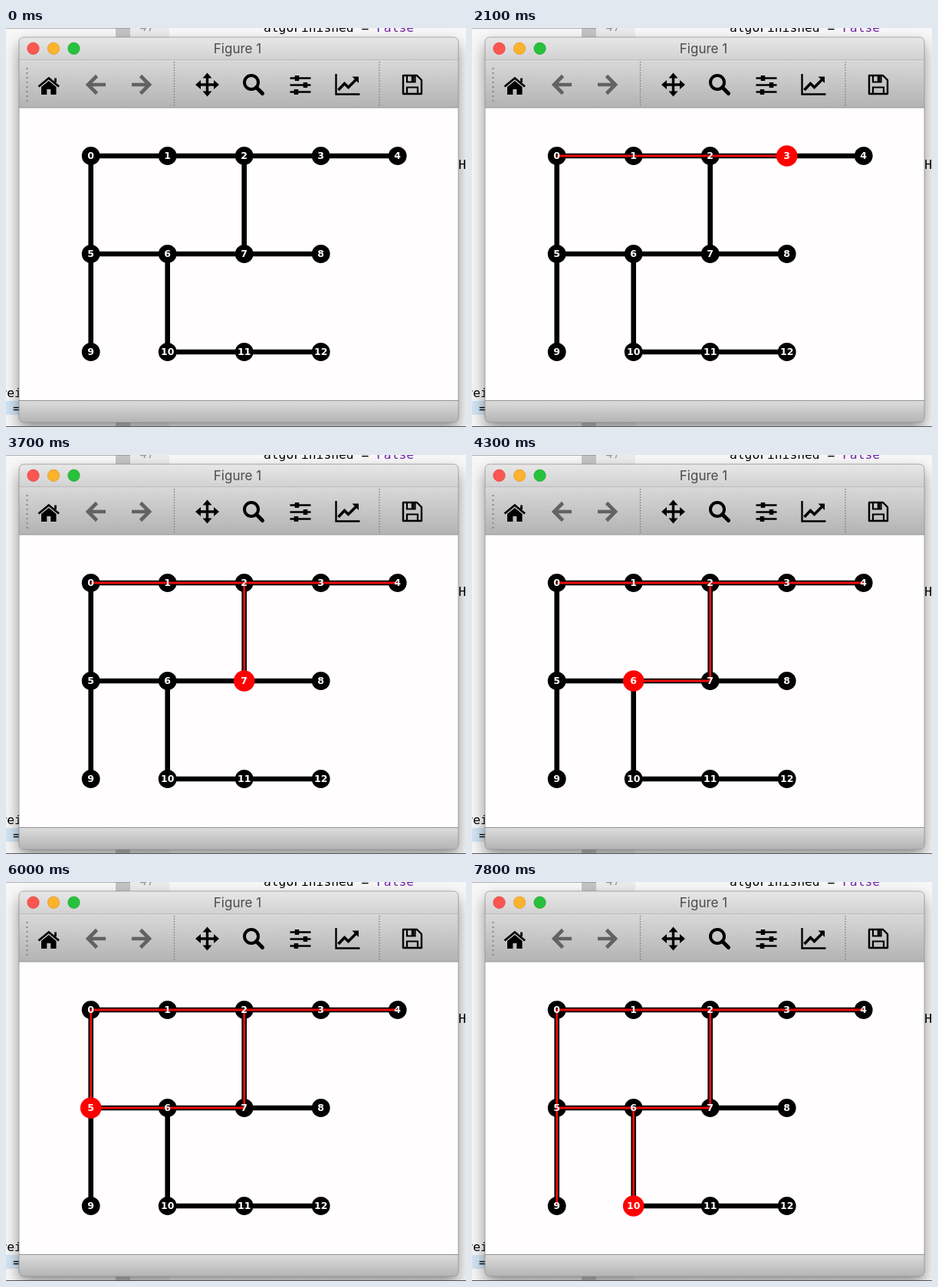
Animation of 600 by 521 pixels, one loop 8000 ms. Source, as an HTML page:

```html
<!DOCTYPE html>
<html lang="en">
<head>
<meta charset="utf-8">
<title>Graph walk</title>
<style>
  html, body { margin: 0; width: 100%; height: 100%; overflow: hidden; background: #f3f3f3; }
  svg { display: block; width: 100%; height: 100%; }
  .code { font: 16.3px "DejaVu Sans Mono", monospace; white-space: pre; }
  .title { font: 17px Inter, Roboto, sans-serif; fill: #4a4a4a; text-anchor: middle; }
  .label { font: bold 12.5px "DejaVu Sans", sans-serif; fill: #fff; text-anchor: middle; }
</style>
</head>
<body>
<svg viewBox="0 0 600 521" preserveAspectRatio="none">
  <defs>
    <linearGradient id="titleFill" x2="0" y2="1">
      <stop stop-color="#e8e7e8"/><stop offset="1" stop-color="#d3d2d3"/>
    </linearGradient>
    <linearGradient id="toolFill" x2="0" y2="1">
      <stop stop-color="#dad9da"/><stop offset="1" stop-color="#b4b3b4"/>
    </linearGradient>
    <linearGradient id="statusFill" x2="0" y2="1">
      <stop stop-color="#dcdbdc"/><stop offset="1" stop-color="#b5b4b5"/>
    </linearGradient>
    <filter id="blur" x="-20%" y="-20%" width="140%" height="140%">
      <feGaussianBlur stdDeviation="10"/>
    </filter>
    <clipPath id="frame"><rect x="17" y="12" width="573" height="503" rx="6"/></clipPath>
  </defs>

  <!-- editor behind the window -->
  <rect width="600" height="521" fill="#f7f7f7"/>
  <rect x="143" width="19" height="521" fill="#c4c4c4"/>
  <rect x="162" width="51" height="521" fill="#ebebeb"/>
  <rect y="487" width="143" height="18" fill="#d3e5f5"/>
  <g class="code">
    <text x="174" y="4" fill="#999">47</text>
    <text x="336" y="4.5">algoFinished = <tspan fill="#7420a8">False</tspan></text>
    <text x="580.5" y="184">LH</text>
    <text x="-8.5" y="482">rei</text>
    <text x="9" y="502">=</text>
  </g>
  <rect x="17" y="22" width="573" height="502" rx="6" filter="url(#blur)" opacity=".42"/>
  <path d="M0 .3H162" stroke="#8a8a8a" stroke-width=".8"/>
  <path d="M0 520.5H600" stroke="#555"/>

  <!-- window -->
  <g clip-path="url(#frame)">
    <rect x="17" y="12" width="573" height="503" fill="#fffdfe"/>
    <rect x="17" y="12" width="573" height="29" fill="url(#titleFill)"/>
    <rect x="17" y="41" width="573" height="63" fill="url(#toolFill)"/>
    <rect x="17" y="487" width="573" height="28" fill="url(#statusFill)"/>
    <path d="M17 41.5H590" stroke="#bdbcbd"/>
    <path d="M17 104H590M17 486.5H590" stroke="#949394"/>
  </g>
  <rect x="17" y="12" width="573" height="503" rx="6" fill="none" stroke="#8b8b8b" stroke-width=".7"/>
  <g stroke-width=".7">
    <circle cx="35.5" cy="26.7" r="7.7" fill="#fc5650" stroke="#dc443f"/>
    <circle cx="62" cy="26.7" r="7.7" fill="#fbb32d" stroke="#db9a27"/>
    <circle cx="88.5" cy="26.7" r="7.7" fill="#27c13c" stroke="#22a733"/>
  </g>
  <text class="title" x="302" y="33">Figure 1</text>

  <!-- toolbar -->
  <path d="M27.5 52V96" stroke="#858585" stroke-width="2" stroke-dasharray="2 4"/>
  <path d="M219.5 44V102M487 44V102" stroke="#777" stroke-width="1.3" stroke-dasharray="1.5 2"/>
  <g stroke="#000" fill="none">
    <path d="M42.5 76.5L55.8 65.5L69 76.5M64.5 65.5V71" stroke-width="2.8"/>
    <path d="M46 77L55.8 69L65.5 77V87H58.3V80H53.3V87H46Z" fill="#000" stroke="none"/>
    <g id="arrow" stroke="#626262" stroke-width="4.6">
      <path d="M130 74H108M118.500 62.500L107 74L118.500 85.500"/>
    </g>
    <use href="#arrow" transform="translate(294 0) scale(-1 1)"/>
    <path d="M250 74H275M262.500 61.500V86.500" stroke-width="3.4"/>
    <path d="M262.500 58.500L268.500 65.500H256.500ZM262.500 89.500L268.500 82.500H256.500ZM247 74L254 68V80ZM278 74L271 68V80Z" fill="#000" stroke="none"/>
    <circle cx="320" cy="71" r="9" stroke-width="4"/>
    <path d="M326.500 77.500L334.500 85.500" stroke-width="5" stroke-linecap="round"/>
    <path d="M370.500 65.500H397.500M370.500 74.500H397.500M370.500 83.500H397.500" stroke-width="2.6"/>
    <path d="M379.500 62V69M390.500 71V78M378.500 80V87" stroke-width="5.5"/>
    <path d="M430.500 60V86.500H461.500" stroke-width="2.4"/>
    <path d="M433.500 81L441.500 72.500L446.500 77.500L457 67" stroke-width="3.6"/>
    <path d="M451.500 63.500H460V72Z" fill="#000" stroke="none"/>
    <path d="M518 62H536L542 68V86H518Z" stroke-width="2.4" stroke-linejoin="round"/>
    <path d="M523 86V77.500H537V86M523 62V70.500H533.500V62" stroke-width="2.2"/>
    <path d="M530.500 62V70" stroke-width="3.500"/>
  </g>

  <!-- graph -->
  <path id="edges" fill="none" stroke="#000" stroke-width="6.6"/>
  <g id="nodes"></g>
  <path id="trail" fill="none" stroke="#e90b0b" stroke-width="2.8" stroke-linejoin="bevel"/>
  <circle id="cursor" r="13.8" fill="#f00"/>
  <g id="labels"></g>
</svg>
<script>
const LOOP = 8000, TICK = 100, START = 207, STEP = 497;
const walk = [0, 1, 2, 3, 4, 3, 2, 7, 6, 5, 0, 5, 9, 5, 6, 10];
const lines = [[0, 4], [5, 8], [10, 12], [0, 9], [2, 7], [6, 10]];

const get = id => document.getElementById(id);
const rows = [5, 4, 4];
const points = rows.flatMap((count, row) =>
  Array.from({ length: count }, (_, col) => [110.7 + col * 100, 167 + row * 128]));

function add(parent, tag, attrs, text = "") {
  const el = document.createElementNS("http://www.w3.org/2000/svg", tag);
  for (const key in attrs) el.setAttribute(key, attrs[key]);
  el.textContent = text;
  get(parent).append(el);
}

const pathOf = ids => ids.length ? "M" + ids.map(id => points[id].join(" ")).join("L") : "";

get("edges").setAttribute("d", lines.map(pathOf).join(""));
points.forEach(([x, y], id) => {
  add("nodes", "circle", { cx: x, cy: y, r: 11.9 });
  add("labels", "text", { class: "label", x, y: y + 4 }, id);
});

function draw(time) {
  const tick = Math.floor(time % LOOP / TICK) * TICK;
  const step = Math.min(Math.floor((tick - START) / STEP), walk.length - 1);
  const cursor = get("cursor");
  get("trail").setAttribute("d", pathOf(walk.slice(0, step + 1)));
  cursor.setAttribute("visibility", step < 0 ? "hidden" : "visible");
  if (step < 0) return;
  const [x, y] = points[walk[step]];
  cursor.setAttribute("cx", x);
  cursor.setAttribute("cy", y);
}

const begin = performance.now();
function loop() {
  draw(performance.now() - begin);
  requestAnimationFrame(loop);
}
loop();
</script>
</body>
</html>
```
